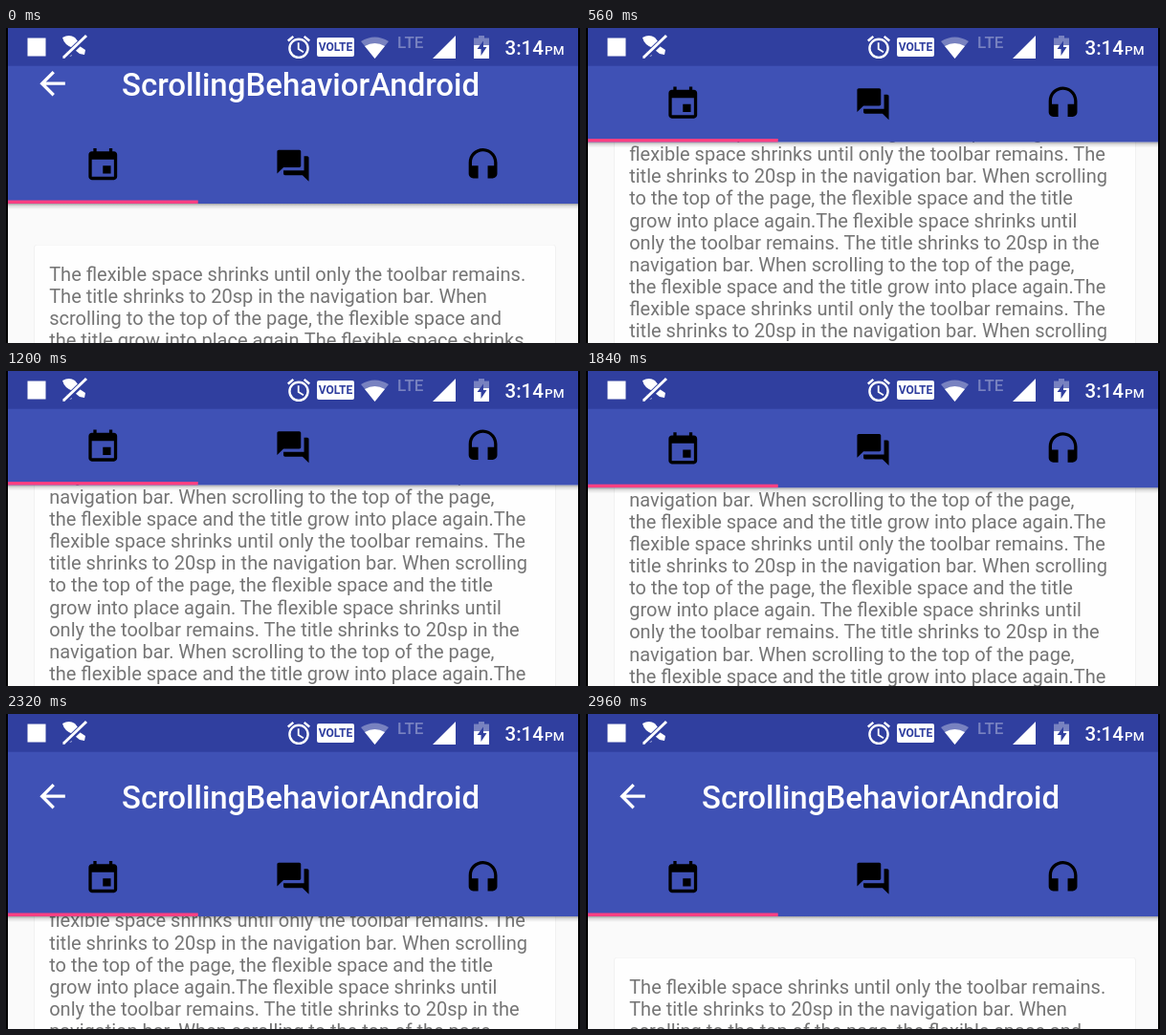
These frames come from a looping animation (600 px wide and 330 px high, 3000 ms). An HTML page:

```html
<!DOCTYPE html>
<html lang="en">
<head>
<meta charset="utf-8">
<title>Scrolling behavior</title>
<style>
  html, body { margin: 0; width: 100%; height: 100%; overflow: hidden; background: #000; }
  svg { display: block; width: 600px; height: 330px; font-family: Roboto, sans-serif; }
  #lines { font-size: 20px; fill: #757575; }
  .title { font-size: 33px; font-weight: 500; fill: #fff; }
  .status { fill: #fff; font-weight: 500; }
  .dim { opacity: .35; }
</style>
</head>
<body>
<svg viewBox="0 0 600 330">
  <defs>
    <linearGradient id="shade" x2="0" y2="1">
      <stop offset="0" stop-opacity=".34"/>
      <stop offset=".4" stop-opacity=".12"/>
      <stop offset="1" stop-opacity="0"/>
    </linearGradient>
    <clipPath id="screen"><rect x="2" width="596" height="330"/></clipPath>
  </defs>
  <rect width="600" height="330"/>
  <g clip-path="url(#screen)">
    <rect width="600" height="330" fill="#fafafa"/>

    <g id="page">
      <rect x="29" y="255" width="546" height="620" rx="3" fill="#000" opacity=".035"/>
      <rect x="30" y="255.5" width="544" height="618" rx="3" fill="#fefefe"/>
      <g id="lines"></g>
    </g>

    <g id="bar">
      <rect y="212" width="600" height="6" fill="url(#shade)"/>
      <rect y="39" width="600" height="173" fill="#3f51b5"/>
      <path fill="#fff" transform="translate(28.7 66.3) scale(1.656)"
        d="M20 11H7.83l5.59-5.59L12 4l-8 8 8 8 1.41-1.41L7.83 13H20z"/>
      <text class="title" x="121" y="98.5">ScrollingBehaviorAndroid</text>
      <path transform="translate(81.4 152.4) scale(1.656)"
        d="M17 12h-5v5h5zM16 1v2H8V1H6v2H5c-1.11 0-1.99.9-1.99 2L3 19c0 1.1.89 2 2 2h14c1.1 0 2-.9 2-2V5c0-1.1-.9-2-2-2h-1V1zm3 18H5V8h14z"/>
      <path transform="translate(280.1 152.4) scale(1.656)"
        d="M21 6h-2v9H6v2c0 .55.45 1 1 1h11l4 4V7c0-.55-.45-1-1-1zm-4 6V3c0-.55-.45-1-1-1H3c-.55 0-1 .45-1 1v14l4-4h10c.55 0 1-.45 1-1z"/>
      <path transform="translate(478.7 152.4) scale(1.656)"
        d="M12 1c-4.97 0-9 4.03-9 9v7c0 1.66 1.34 3 3 3h3v-8H5v-2c0-3.87 3.13-7 7-7s7 3.13 7 7v2h-4v8h3c1.66 0 3-1.34 3-3v-7c0-4.97-4.03-9-9-9z"/>
      <rect x="2" y="208.5" width="198.7" height="3.4" fill="#ff4081"/>
    </g>

    <g class="status">
      <rect width="600" height="39.7" fill="#303f9f"/>
      <rect x="22.5" y="10.5" width="19" height="19"/>
      <path d="M59 10q7-4 13 0l4 5-6 6q-9-3-11-11zM72 23l5-4 6 4-1 5-5-1z"/>
      <path d="M59 32l5-8 5 5z"/>
      <path d="M61 31L84 9" stroke="#303f9f" stroke-width="6"/>
      <path d="M60 31L84 8" stroke="#fff" stroke-width="3"/>
      <path transform="translate(291.6 5.7) scale(1.2)"
        d="M22 5.72l-4.6-3.86-1.29 1.53 4.6 3.86zM7.88 3.39L6.6 1.86 2 5.71l1.29 1.53zM12.5 8H11v6l4.75 2.85.75-1.23-4-2.37zM12 4a9 9 0 1 0 0 18 9 9 0 0 0 0-18zm0 16a7 7 0 1 1 0-14 7 7 0 0 1 0 14z"/>
      <rect x="325" y="10" width="39" height="20" rx="2"/>
      <text x="344.5" y="24.4" font-size="12" font-weight="700" text-anchor="middle" fill="#303f9f">VOLTE</text>
      <path class="dim" d="M385.5 32L371 14q14.500-9 29 0z"/>
      <path d="M385.500 32L375 19q10.500-6 21 0z"/>
      <text class="dim" x="409" y="21" font-size="17">LTE</text>
      <path d="M446 32L470 8V32z"/>
      <path class="dim" d="M489 18V10.500h5V8h6v2.500h5V18z"/>
      <path d="M489 18h16v14h-16z"/>
      <path fill="#303f9f" d="M499 13.500l-6.500 8.500h4v7l6-9h-3.500z"/>
      <text x="521.500" y="27.700" font-size="20.500">3:14</text>
      <text x="563" y="27.700" font-size="13.500">PM</text>
    </g>
  </g>
</svg>
<script>
  const LOOP = 3000, STEP = 40, PITCH = 23.15, TOOLBAR = 92.5, END = 432;

  const head = [
    'The flexible space shrinks until only the toolbar remains.',
    'The title shrinks to 20sp in the navigation bar. When',
    'scrolling to the top of the page, the flexible space and',
    'the title grow into place again.The flexible space shrinks',
    'until only the toolbar remains. The title shrinks to 20sp in',
    'the navigation bar. When scrolling to the top of the page,'
  ];
  const body = [
    'the flexible space and the title grow into place again.The',
    'flexible space shrinks until only the toolbar remains. The',
    'title shrinks to 20sp in the navigation bar. When scrolling',
    'to the top of the page, the flexible space and the title',
    'grow into place again.The flexible space shrinks until',
    'only the toolbar remains. The title shrinks to 20sp in the',
    'navigation bar. When scrolling to the top of the page,'
  ];
  const lines = [...head, ...body, ...body, ...body.slice(0, 3)];
  lines[17] = lines[17].replace('.The', '. The');

  const $ = id => document.getElementById(id);
  lines.forEach((line, i) => {
    const el = document.createElementNS('http://www.w3.org/2000/svg', 'text');
    el.setAttribute('x', 45.2);
    el.setAttribute('y', 293 + i * PITCH);
    el.textContent = line;
    $('lines').append(el);
  });

  // time (ms), scrolled distance (px), speed (px/ms)
  const keys = [
    [0, 28, .46], [200, 125, .51], [560, 316, .53], [1000, END, 0],
    [1800, END, 0], [2120, 322, -.46], [2560, 123.5, -.46], [2840, 0, -.4], [LOOP, 0, 0]
  ];

  function scrollAt(t) {
    const i = keys.findIndex(k => k[0] > t);
    const [t0, y0, v0] = keys[i - 1], [t1, y1, v1] = keys[i];
    if (y0 === y1) return y0;
    const d = t1 - t0, u = (t - t0) / d, w = 1 - u;
    return w * w * ((1 + 2 * u) * y0 + u * d * v0) + u * u * ((3 - 2 * u) * y1 - w * d * v1);
  }

  const shift = (id, y) => $(id).setAttribute('transform', `translate(0 ${-y.toFixed(2)})`);

  function draw(now) {
    const t = Math.floor(now % LOOP / STEP) * STEP;
    const y = scrollAt(t);
    // the toolbar hides first on the way down and returns first on the way up
    const hidden = t < 1800 ? Math.min(y, TOOLBAR) : Math.max(0, TOOLBAR - (END - y));
    shift('page', y);
    shift('bar', hidden);
  }

  let start;
  function tick(now) {
    start ??= now;
    draw(now - start);
    requestAnimationFrame(tick);
  }
  draw(0);
  requestAnimationFrame(tick);
</script>
</body>
</html>
```
